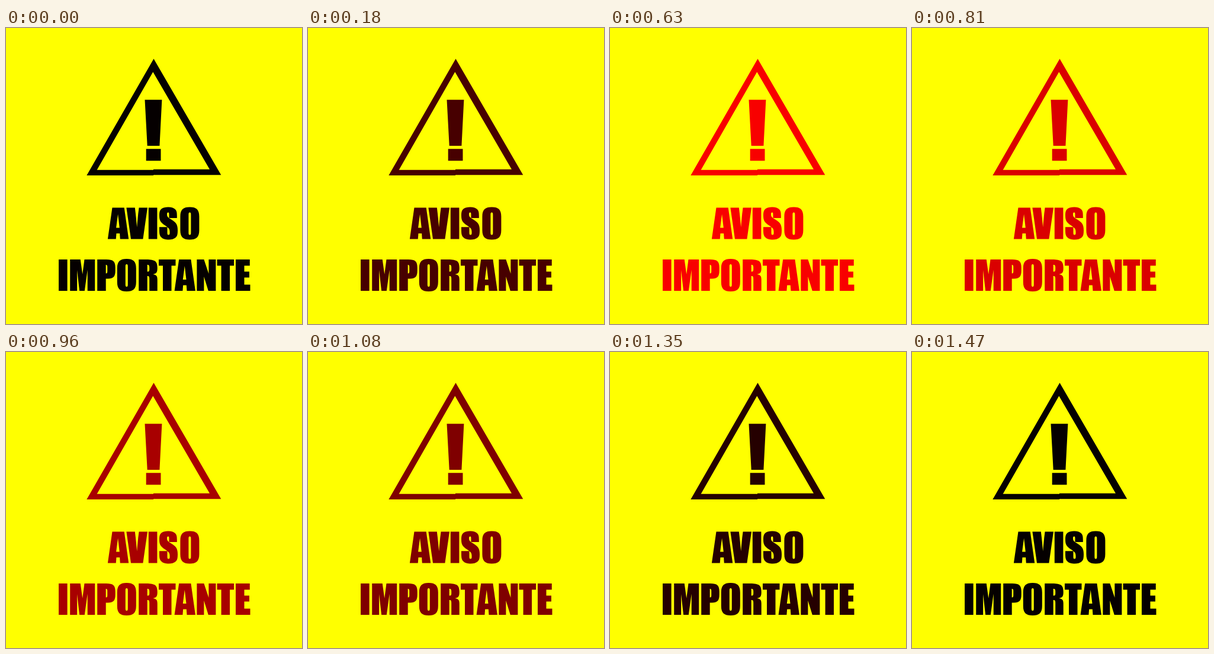
An HTML page for the animation above (1.5 s loop, 500 px wide and 500 px high).

```html
<!DOCTYPE html>
<html lang="es">
<head>
<meta charset="utf-8">
<title>Aviso importante</title>
<style>
  html, body { margin: 0; height: 100%; overflow: hidden; background: #ff0; }
  svg { display: block; width: 100vw; height: 100vh; }
</style>
</head>
<body>
<svg viewBox="0 0 500 500" role="img" aria-label="AVISO IMPORTANTE" fill-rule="evenodd">
  <path d="M249.5 52L363.3 248.3H249V249H136.3ZM248.3 74.3L153.6 239.7H249V238.7H344Z"/>
  <path d="M234.5 121.2H263.4L259.4 199H238.7ZM236.7 204.2H261.5V224.3H236.7Z"/>
</svg>
<script>
const svg = document.querySelector('svg');

// Heavy condensed capitals, 53 units tall
const glyphs = {
  A: 'M7.6 0H27.8L35.3 53H20.9L20.2 43.5H14.6L13.8 53H0ZM14.2 34H19.9L17.2 11Z',
  E: 'M0 0H23.8V10.6H14.5V20.5H23V30.6H14.5V42.4H24.5V53H0Z',
  I: 'M0 0H14.6V53H0Z',
  M: 'M0 0H17.5L21 25L24.3 0H42V53H29.5V17.5L24.6 53H15.9L11.9 18V53H0Z',
  N: 'M0 0H12L20 24V0H32V53H19.4L12 29V53H0Z',
  O: 'M0 15C0 3 5-1 16-1S32 3 32 15V38C32 50 27 54 16 54S0 50 0 38Z' +
     'M14 12V42C14 45 14.5 46 16 46S18 45 18 41.5V12C18 9 17.5 8 16 8S14 9 14 12Z',
  P: 'M0 0H15C27 0 30.5 3 30.5 14V19C30.5 29 27 32.5 18 32.5H14.5V53H0Z' +
     'M14.5 9V23.5C16.5 23.5 17 23 17 19.5V13C17 10 16.5 9 14.5 9Z',
  R: 'M0 0H10C26 0 31.5 1.5 31.5 14C31.5 21 30.5 24 24 25C30 26 31.5 28 31.5 34V53H18V33C18 29 17.5 28 14.5 28V53H0Z' +
     'M14.5 9V20.5C17 20.5 18 20 18 17V13.5C18 10 17 9 14.5 9Z',
  S: 'M29.8 17.5H16.5V12C16.5 9 16.2 8 14.9 8S13 9 13 11C13 14 13.5 15.5 17 18C27.5 24.5 31 27 31 38' +
     'C31 45 30.4 48 27.5 50.5C24.7 53 20.5 54 16 54C10.5 54 5.7 52.8 3 49.8C.5 47 0 44 0 37V32.8H13.5V41' +
     'C13.5 45 14 46 15.5 46S17.6 45 17.6 42C17.6 36 16.5 35 10.5 30.6C4 26 0 23.5 0 14' +
     'C0 7.5.7 4.5 3.6 2C6.5-.3 10.5-1 15-1C20.5-1 24.5.3 27 3C29.5 5.7 29.8 8.5 29.8 14Z',
  T: 'M0 0H28.5V10.6H21.5V53H7V10.6H0Z',
  V: 'M35.6 0L28 53H7.6L0 0H14.4C16 13 17 23.5 17.8 33C18.6 23.5 19.3 16 19.9 10L21.2 0Z',
};

function letter(word, y, lefts) {
  lefts.forEach((x, i) => {
    const path = document.createElementNS(svg.namespaceURI, 'path');
    path.setAttribute('d', glyphs[word[i]]);
    path.setAttribute('transform', `translate(${x} ${y})`);
    svg.append(path);
  });
}
letter('AVISO', 303.5, [171.9, 203.4, 240.8, 259, 294.4]);
letter('IMPORTANTE', 391, [89, 108.2, 154.2, 187.8, 224.2, 258, 284.6, 322.4, 356.6, 388]);

const LOOP = 1500, STEP = 30, DARKEST = 5, PEAK = 248;
const RISE_END = 630, FALL_START = 720, FALL_END = 1460;

function redAt(t) {
  const rise = t / RISE_END;
  const fall = (FALL_END - t) / (FALL_END - FALL_START);
  return Math.round(Math.max(DARKEST, PEAK * Math.min(1, rise, fall)));
}

function draw() {
  const t = Math.floor(performance.now() % LOOP / STEP) * STEP;
  svg.style.fill = `rgb(${redAt(t)}, 0, 0)`;
  requestAnimationFrame(draw);
}
draw();
</script>
</body>
</html>
```
